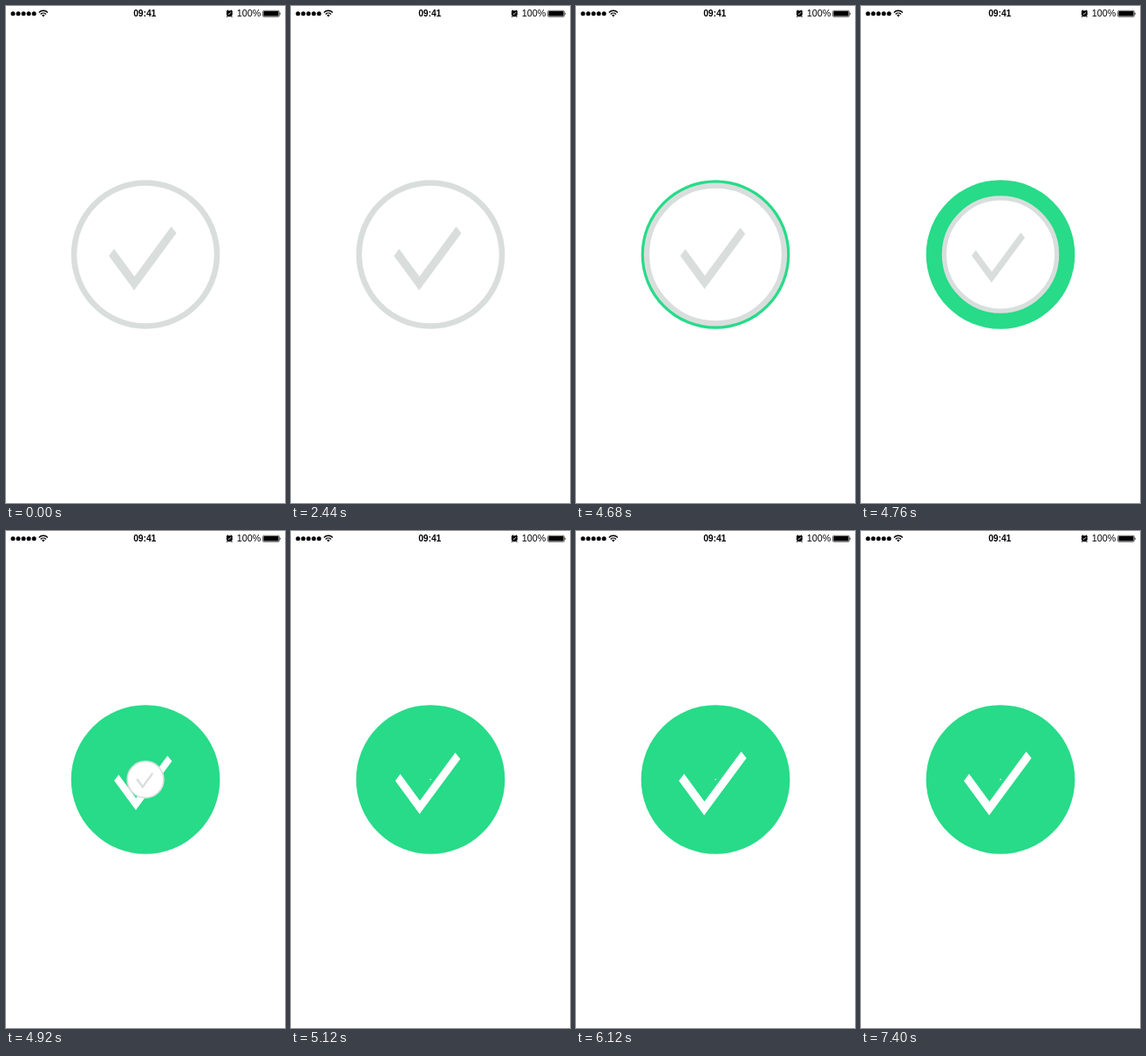
These frames come from a looping animation (320x569 px, 8 s). An HTML page:

```html
<!DOCTYPE html>
<html lang="en">
<head>
<meta charset="utf-8">
<title>Check confirmation</title>
<style>
  html, body { margin: 0; height: 100%; overflow: hidden; background: #fff; }
  svg { display: block; width: 100%; height: 100%; }
  text { font-family: "Liberation Sans", Arial, sans-serif; }
</style>
</head>
<body>
<svg viewBox="0 0 320 569">
  <defs>
    <path id="check" d="M-36-6.5-42 1.5-13 41 35.5-24.5 29.5-32-12.7 25.2Z"/>
  </defs>

  <g id="status">
    <path d="M8 8.8h24.2" fill="none" stroke="#000" stroke-width="5" stroke-linecap="round" stroke-dasharray="0 6.04"/>
    <g fill="none" stroke="#000" stroke-width="1.4">
      <path d="M37.8 7.4a7 7 0 0 1 10 0M39.7 9.4a4.4 4.4 0 0 1 6.2 0"/>
    </g>
    <path d="M42.8 12.4l-1.7-1.8a2.5 2.5 0 0 1 3.4 0Z"/>
    <text x="159.2" y="12.4" font-size="10.2" font-weight="700" text-anchor="middle">09:41</text>
    <circle cx="256.3" cy="8.8" r="3.5"/>
    <path d="M252.9 6.6l2-1.9M259.7 6.6l-2-1.9M254 11.8l-.8.9M258.6 11.8l.8.9" stroke="#000" stroke-width="1.2"/>
    <path d="M256.3 9.2l1.6-2M256.3 9.2h-1.6" stroke="#fff" stroke-width=".8"/>
    <text x="264.8" y="12.4" font-size="10.7">100%</text>
    <rect x="294.6" y="5.3" width="18.8" height="7" rx="1.2" fill="#fff" stroke="#000" stroke-width=".6"/>
    <rect x="295.4" y="6.1" width="17.2" height="5.4" rx=".6"/>
    <path d="M314.2 7.4a1.7 1.7 0 0 1 0 2.8Z"/>
  </g>

  <g transform="translate(160 284.5)">
    <g id="done">
      <circle r="85.3" fill="#27db88"/>
      <use id="tick" href="#check" fill="#fff"/>
    </g>
    <g id="idle">
      <circle r="82" fill="#fff" stroke="#d9dedd" stroke-width="6.6"/>
      <use href="#check" fill="#d9dedd"/>
    </g>
  </g>
</svg>
<script>
  const LOOP = 8000, START = 4626, PEAK = 5480, SETTLED = 5800;
  const [done, tick, idle] = ['done', 'tick', 'idle'].map(id => document.getElementById(id));

  // Eased value between two keyframes, held outside them
  function tween(t, t0, t1, from, to) {
    const u = Math.min(1, Math.max(0, (t - t0) / (t1 - t0)));
    return from + (to - from) * (1 - Math.cos(Math.PI * u)) / 2;
  }

  const scale = (el, s) => el.setAttribute('transform', `scale(${s})`);

  function draw(now) {
    const t = now % LOOP;
    done.setAttribute('visibility', t < START ? 'hidden' : 'visible');
    scale(idle, tween(t, START, START + 441, 1, 0.01));
    scale(tick, t < PEAK
      ? tween(t, START, PEAK, 0.775, 1.075)
      : tween(t, PEAK, SETTLED, 1.075, 1));
    requestAnimationFrame(draw);
  }
  draw(performance.now());
</script>
</body>
</html>
```
